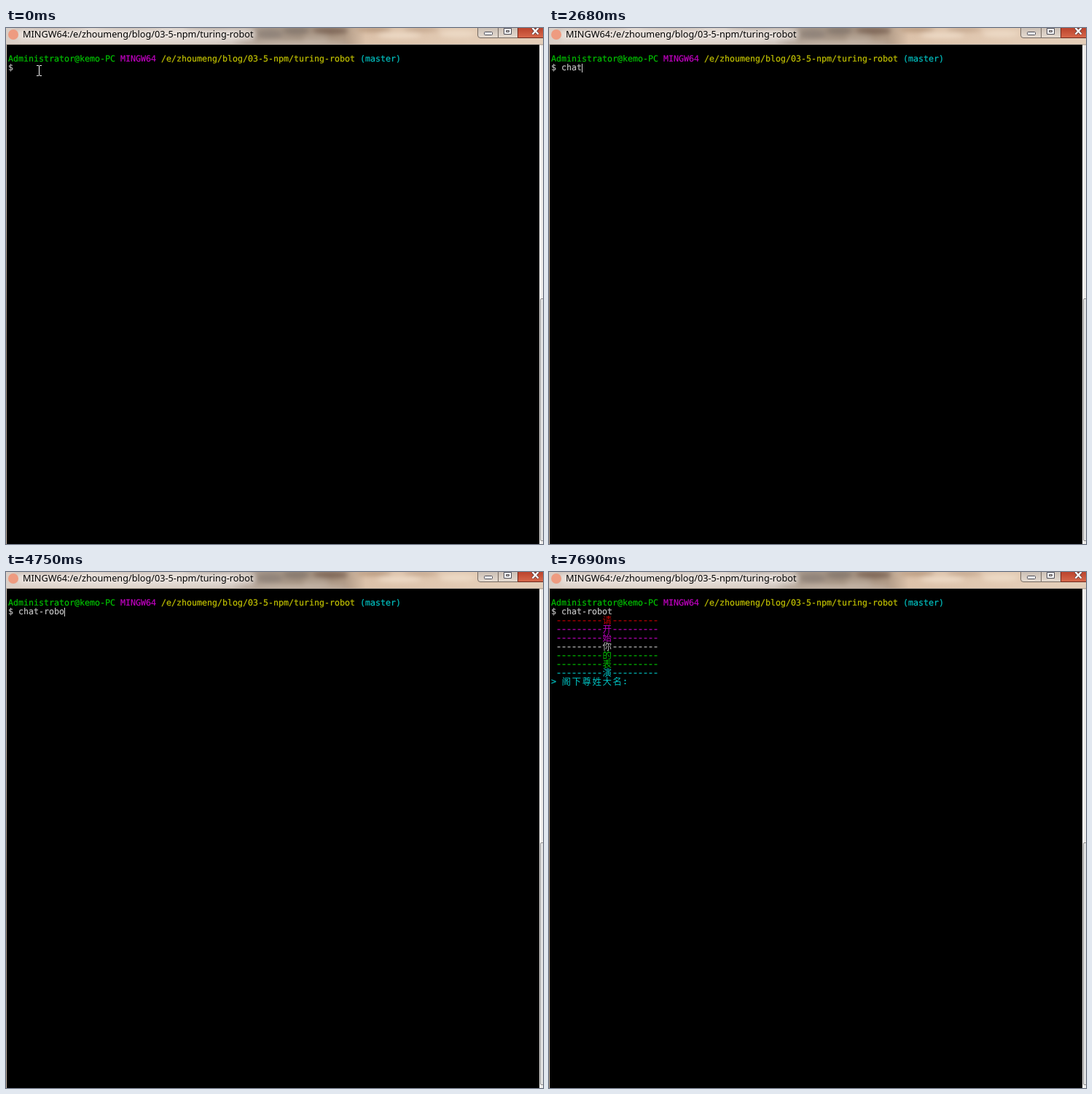
An HTML page for the animation above (8000 ms loop, 737 by 708 pixels).

```html
<!DOCTYPE html>
<html lang="zh-CN">
<head>
<meta charset="utf-8">
<title>Terminal</title>
<style>
html, body { margin: 0; width: 100%; height: 100%; overflow: hidden; background: #000; }
svg { display: block; width: 737px; height: 708px; }
text { white-space: pre; }
.mono { font: 11.63px "DejaVu Sans Mono", monospace; text-rendering: geometricPrecision; }
.dash { font: 11.667px "Noto Sans Mono", monospace; text-rendering: geometricPrecision; }
.mono, .dash { fill: currentColor; stroke: currentColor; stroke-width: .22px; }
.cjk { font: 12.5px "Noto Sans CJK SC", "Noto Sans CJK", sans-serif; fill: currentColor; }
.title { font: 12.7px "Noto Sans", sans-serif; }
</style>
</head>
<body>
<svg viewBox="0 0 737 708">
  <defs>
    <linearGradient id="glass">
      <stop offset="0" stop-color="#d9cec6"/>
      <stop offset=".2" stop-color="#ddd3cb"/>
      <stop offset=".42" stop-color="#d2c7bf"/>
      <stop offset=".47" stop-color="#a8998c"/>
      <stop offset=".56" stop-color="#a39180"/>
      <stop offset=".63" stop-color="#b09a86"/>
      <stop offset=".67" stop-color="#dcc2aa"/>
      <stop offset="1" stop-color="#e6d0ba"/>
    </linearGradient>
    <linearGradient id="edge" x2="0" y2="1">
      <stop offset="0" stop-color="#ddd0c2"/>
      <stop offset=".3" stop-color="#cdbdae"/>
      <stop offset=".6" stop-color="#a08d7d"/>
      <stop offset="1" stop-color="#c8b7a8"/>
    </linearGradient>
    <linearGradient id="btn" x2="0" y2="1">
      <stop offset="0" stop-color="#c9bdb2"/>
      <stop offset="1" stop-color="#e6dcd2"/>
    </linearGradient>
    <linearGradient id="red" x2="0" y2="1">
      <stop offset="0" stop-color="#b8402a"/>
      <stop offset="1" stop-color="#d8694c"/>
    </linearGradient>
    <filter id="soft" x="-20%" y="-100%" width="140%" height="300%"><feGaussianBlur stdDeviation="3"/></filter>
    <clipPath id="bar"><path d="M0 0H737V23H0z"/></clipPath>
  </defs>

  <rect width="737" height="708" fill="url(#edge)"/>
  <g clip-path="url(#bar)">
    <rect width="737" height="24" fill="url(#glass)"/>
    <g id="blots" filter="url(#soft)"></g>
    <rect x="16" y="2" width="326" height="14" rx="6" fill="#f4efeb" opacity=".6" filter="url(#soft)"/>
    <path d="M0 22.5H737" stroke="#b5a99e"/>
  </g>
  <circle cx="10" cy="9" r="7" fill="#ee9b80"/>
  <text class="title" x="23" y="13">MINGW64:/e/zhoumeng/blog/03-5-npm/turing-robot</text>

  <g stroke="#756a62">
    <path d="M647.5 -1V10Q647.5 13.5 651 13.5H675.5V-1z" fill="url(#btn)"/>
    <path d="M675.5 -1H702.5V13.5H675.5z" fill="url(#btn)"/>
    <path d="M702.5 -1H738V13.5H702.5z" fill="url(#red)" stroke="#6e2a20"/>
  </g>
  <g fill="#fff" stroke="#4b4b55">
    <rect x="656.5" y="5.5" width="11" height="4" rx="1"/>
    <path d="M683.5 .5H693.5V8.5H683.5zM686.5 3.5V5.5H690.5V3.5z" fill-rule="evenodd"/>
  </g>
  <path d="M722.5 0L730.5 8.5M730.5 0L722.5 8.5" stroke="#5b3a3a" stroke-width="4"/>
  <path d="M722.5 0L730.5 8.5M730.5 0L722.5 8.5" stroke="#fff" stroke-width="2.4"/>

  <rect x="1" y="23" width="731" height="685" fill="#000"/>
  <rect x="732" y="24" width="5" height="684" fill="#f0eeec"/>
  <path d="M738 371.5H735Q733.5 371.5 733.5 373V702Q733.5 703.5 735 703.5H738" fill="#e4e4e4" stroke="#8f8f8f"/>

  <g id="screen"></g>
  <text id="prompt" class="mono" x="3" y="58" color="#bfbfbf"></text>
  <g id="output"></g>
  <rect id="caret" width="1" height="12" fill="#d0d0d0"/>
  <path id="mouse" d="M42 51.5H45M46 51.5H49M45.5 52V65M42 65.5H45M46 65.5H49" stroke="#fff" fill="none"/>
</svg>
<script>
const LOOP = 8000, CELL = 7, ROW = 12, LEFT = 3, TOP = 37;
const RED = '#bf0000', PINK = '#bf00bf', GREY = '#bfbfbf',
      GREEN = '#00bf00', CYAN = '#00bfbf', YELLOW = '#bfbf00';
const $ = id => document.getElementById(id);

function add(parent, tag, attrs, text = '') {
  const el = document.createElementNS('http://www.w3.org/2000/svg', tag);
  for (const k in attrs) el.setAttribute(k, attrs[k]);
  el.textContent = text;
  parent.append(el);
}

const put = (parent, row, col, text, color, cls = 'mono') =>
  add(parent, 'text', { class: cls, x: LEFT + col * CELL, y: TOP + row * ROW + 9, color }, text);

// Wide characters take two cells each
const putWide = (parent, row, col, text, color) => [...text].forEach((ch, i) =>
  add(parent, 'text', { class: 'cjk', x: LEFT + (col + 2 * i) * CELL + 0.5, y: TOP + row * ROW + 10, color }, ch));

// Blurred backdrop seen through the title bar: cx, cy, rx, ry, colour
[
  [60, 0, 50, 3, '#b9aaa0'], [170, 1, 45, 3, '#c0b2a8'], [285, 0, 40, 3, '#a99b91'],
  [362, 8, 18, 6, '#91847a'], [398, 4, 18, 5, '#887a70'], [425, 14, 18, 6, '#b3a292'],
  [445, 4, 24, 5, '#80695a'], [505, 2, 24, 3, '#b49479'], [540, 10, 30, 4, '#eddac6'],
  [570, 2, 24, 3, '#c2a58c'], [620, 8, 25, 5, '#ecd9c5'], [690, 19, 60, 4, '#e3cdb8'],
  [400, 21, 70, 3, '#cbbcae'], [150, 20, 150, 3, '#e2d7cd']
].forEach(([cx, cy, rx, ry, fill]) => add($('blots'), 'ellipse', { cx, cy, rx, ry, fill }));

put($('screen'), 0, 0, 'Administrator@kemo-PC', GREEN);
put($('screen'), 0, 22, 'MINGW64', PINK);
put($('screen'), 0, 30, '/e/zhoumeng/blog/03-5-npm/turing-robot', YELLOW);
put($('screen'), 0, 69, '(master)', CYAN);

const out = $('output'), dashes = '-'.repeat(9);
const tints = [RED, PINK, PINK, GREY, GREEN, GREEN, CYAN];
[...'请开始你的表演'].forEach((ch, i) => {
  put(out, i + 2, 1, dashes, tints[i], 'dash');
  putWide(out, i + 2, 10, ch, tints[i]);
  put(out, i + 2, 12, dashes, tints[i], 'dash');
});
put(out, 9, 0, '>', CYAN);
putWide(out, 9, 2, '阁下尊姓大名', CYAN);
put(out, 9, 14, ':', CYAN);

// Start time, typed text, caret shown, caret row (1 = prompt)
const steps = [
  [0, '', 0, 1], [400, '', 1, 1], [960, '', 0, 1],
  [1110, 'c', 1, 1], [1360, 'ch', 1, 1], [1510, 'cha', 1, 1],
  [1820, 'char', 1, 1], [2410, 'char', 0, 1], [2560, 'cha', 1, 1],
  [2680, 'chat', 1, 1], [2950, 'chat=', 1, 1], [3380, 'chat', 1, 1],
  [3690, 'chat-', 1, 1], [4240, 'chat-', 0, 1], [4360, 'chat-r', 1, 1],
  [4480, 'chat-ro', 1, 1], [4600, 'chat-rob', 1, 1], [4750, 'chat-robo', 1, 1],
  [5060, 'chat-robot', 1, 1], [5680, 'chat-robot', 1, 2], [5990, 'chat-robot', 1, 9],
  [6520, 'chat-robot', 0, 9], [7070, 'chat-robot', 1, 9], [7690, 'chat-robot', 0, 9]
];

const show = (el, on) => el.setAttribute('visibility', on ? 'visible' : 'hidden');

function draw(t) {
  const [, typed, blink, row] = steps.findLast(s => s[0] <= t);
  const col = row === 1 ? 2 + typed.length : row === 2 ? 0 : 15;
  $('prompt').textContent = '$ ' + typed;
  $('caret').setAttribute('x', LEFT + col * CELL);
  $('caret').setAttribute('y', TOP + row * ROW);
  show($('caret'), blink);
  show($('mouse'), t < 1110);
  show(out, t >= 5990);
}

const start = performance.now();
function tick() {
  draw((performance.now() - start) % LOOP);
  requestAnimationFrame(tick);
}
draw(0);
requestAnimationFrame(tick);
</script>
</body>
</html>
```
